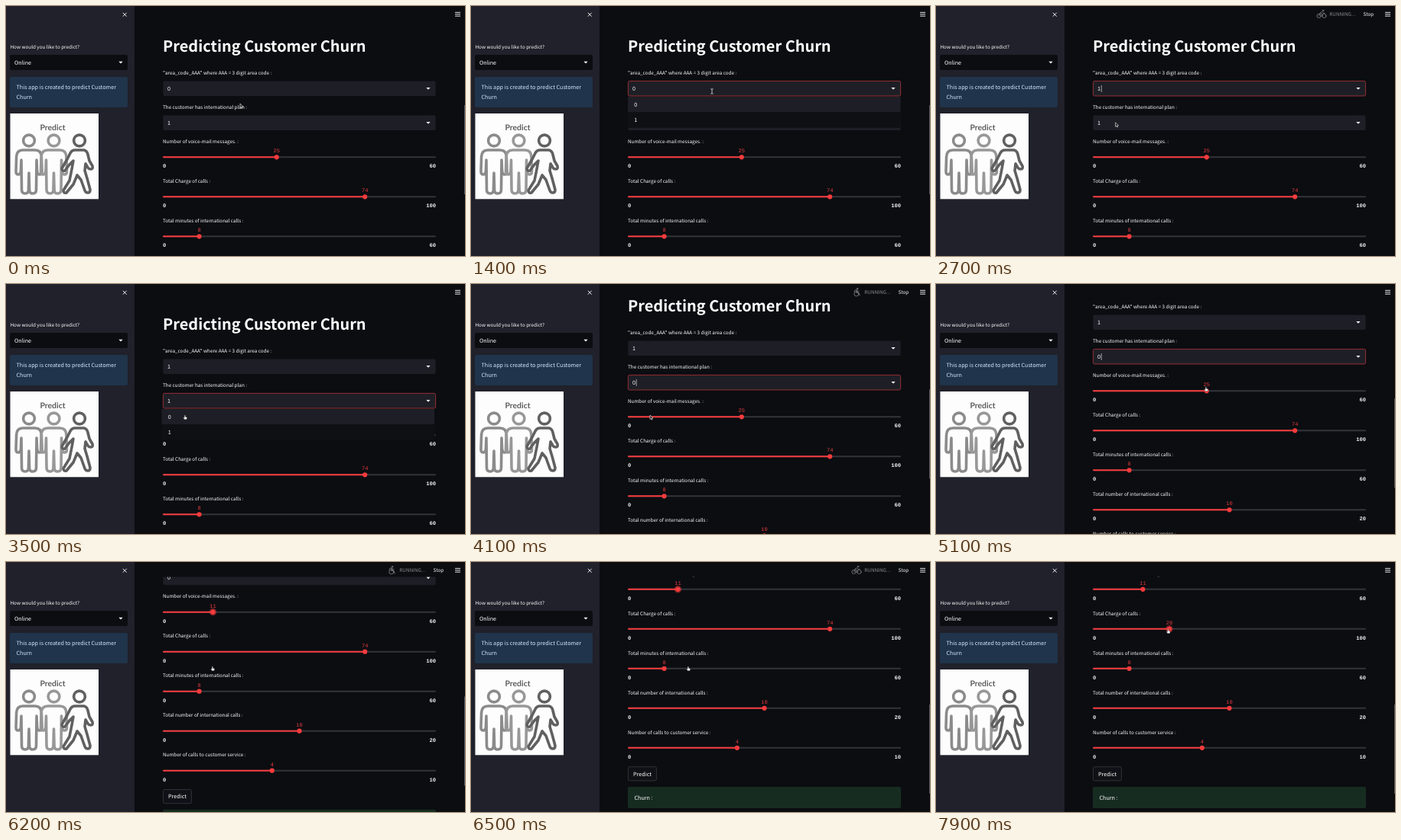
Recreate the animation shown at these times as an HTML page. Size 600x328 px, loop 8 s.

```html
<!DOCTYPE html>
<html lang="en">
<head>
<meta charset="utf-8">
<title>Predicting Customer Churn</title>
<style>
html, body { margin: 0; width: 100%; height: 100%; overflow: hidden; background: #0b0d11; }
svg { display: block; width: 600px; height: 328px; }
text {
  font: 500 6.35px "Noto Sans CJK JP", "Noto Sans CJK SC", "Noto Sans", sans-serif;
  fill: #fff; text-rendering: geometricPrecision; white-space: pre;
}
text.title { font-size: 19.95px; font-weight: 700; }
text.body { font-size: 7.2px; }
text.mono { font: 700 7.1px "Liberation Mono", monospace; fill: #f0f0f2; }
text.red { fill: #e63c3e; font-weight: 400; }
text.end { text-anchor: end; }
text.mid { text-anchor: middle; }
text.info { fill: #d3e9fc; }
text.dim { fill: #8d8e94; }
text.art { font: 700 10.4px Lato, sans-serif; fill: #5c5c5c; text-anchor: middle; }
.person { fill: none; stroke-width: 3.6; stroke-linejoin: round; stroke-linecap: round; }
.icon { fill: none; stroke: #85868c; stroke-width: .8; stroke-linecap: round; stroke-linejoin: round; }
</style>
</head>
<body>
<svg viewBox="0 0 600 328">
  <defs>
    <g id="standing">
      <circle cy="176.5" r="7.4"/>
      <path d="M-8 189H8Q16 189 16.4 198L17 217Q17 221 14 221T10.6 217L10 202 9.5 241Q9.5 246 5 246T.6 241L0 219-.6 241Q-.6 246-5 246T-9.5 241L-10 202-10.6 217Q-11 221-14 221T-17 217L-16.4 198Q-16 189-8 189Z"/>
    </g>
    <g id="walking">
      <circle cx="96" cy="176.5" r="7.4"/>
      <path d="M90 189H102Q106 190 107 195L109 203 113 210Q114 214 111 214T107 212L104 207 103 216 106 226 110 241Q110 245 107 245T103 242L98 228 93 222 88 234 79 245Q75 246 75 242L83 229 86 214 88 203 83 208 77 216Q73 217 73 213L80 201 84 193Q86 189 90 189Z"/>
    </g>
    <path id="arrow" d="M0 0V5.4L1.3 4.3 2.2 6.2 3 5.8 2.2 4H3.9Z" fill="#111" stroke="#fff" stroke-width=".6"/>
    <path id="hand" d="M-.8-2.6Q0-3.3.6-2.6V-.7L2.2-.3Q2.8 0 2.6.8L2.1 2.7H-.9L-2.2.6Q-2.2-.2-1.5 0L-.8.5Z" fill="#fff" stroke="#333" stroke-width=".5"/>
    <path id="beam" d="M-1.6-3.3Q0-3.3 0-2.4 0-3.3 1.6-3.3M0-2.4V2.4M-1.6 3.3Q0 3.3 0 2.4 0 3.3 1.6 3.3" fill="none" stroke="#e6e6e6" stroke-width=".8"/>
    <path id="chevron" d="M-2.6-1.2H2.6L0 1.5Z" fill="#fff"/>
    <g id="bike" class="icon">
      <circle cx="500.5" cy="13" r="2.6"/><circle cx="507.5" cy="13" r="2.6"/>
      <path d="M500.5 13 502 9.3 505 11 504.5 13.6M502 9.3 504.5 7.6 506 9.4H508"/>
      <circle cx="506" cy="6" r=".8"/>
    </g>
    <g id="chair" class="icon">
      <circle cx="503.8" cy="13" r="3"/><circle cx="505" cy="6.2" r=".8"/>
      <path d="M504.4 8 503.8 11.5H507L508.2 15M504.2 9.3H507M501 10.2 502 8 504.4 8"/>
    </g>
  </defs>

  <g id="page"></g>
  <rect x="168" width="432" height="19.5" fill="#0b0d11"/>
  <g id="head"></g>
  <path d="M587 8.4H594M587 10.8H594M587 13.2H594" stroke="#e4e4e6" stroke-width="1"/>
  <rect id="bar" x="599" width="1" height="117" fill="#5c5d62"/>

  <rect width="168" height="328" fill="#20212a"/>
  <path d="M152.8 8.8 157.7 13.7M157.7 8.8 152.8 13.7" stroke="#f0f0f2" stroke-width="1"/>
  <text x="5.5" y="56.3">How would you like to predict?</text>
  <rect x="5" y="64" width="154" height="20" rx="2" fill="#0b0d11"/>
  <text class="body" x="11" y="76.8">Online</text>
  <use href="#chevron" x="150" y="74"/>
  <rect x="5" y="93" width="154" height="40" rx="2" fill="#20344b"/>
  <text class="body info" x="13.5" y="109.3">This app is created to predict Customer</text>
  <text class="body info" x="13.5" y="121.8">Churn</text>
  <rect x="5.5" y="141" width="115.5" height="112.3" fill="#fdfdfd"/>
  <text class="art" x="61" y="163.3">Predict</text>
  <g class="person">
    <use href="#standing" x="30" stroke="#8b8b8b"/>
    <use href="#standing" x="62.5" stroke="#989898"/>
    <use href="#walking" stroke="#606060"/>
  </g>
  <use id="cursor"/>
</svg>
<script>
const LOOP = 8000, STEP = 100, LEFT = 205, WIDTH = 357;
const get = id => document.getElementById(id);

// [time, value...] rows, linear between them
const scrollKeys = [[3800, 0], [4100, 24], [4500, 58], [5700, 58], [6400, 162.5]];
const voiceKeys = [[5200, 25], [5600, 11]];
const chargeKeys = [[7600, 74], [7900, 28]];
const cursorKeys = [
  [300, 306, 128], [900, 315, 112], [1400, 315, 112], [1900, 236, 150], [2200, 236, 150],
  [2900, 234, 154], [3100, 234, 154], [3500, 234, 175], [3800, 234, 175], [4100, 234, 172],
  [4500, 234, 172], [5100, 353, 138], [5200, 353, 138], [5600, 270, 140], [6200, 270, 140],
  [6500, 284, 140], [7200, 469, 89], [7600, 469, 89], [7900, 303.5, 91]
];
// [start, shape]
const shapes = [[0, 'arrow'], [600, 'beam'], [1600, 'hand'], [2300, 'arrow'], [2800, 'beam'],
  [3200, 'hand'], [3800, 'arrow'], [4900, 'hand']];
const busy = [[2200, 3100], [3800, 4700], [5700, 6900]];

const within = (t, a, b) => t >= a && t < b;

function at(keys, t) {
  if (t <= keys[0][0]) return keys[0].slice(1);
  for (let i = 1; i < keys.length; i++) {
    const [a, ...from] = keys[i - 1], [b, ...to] = keys[i];
    if (t <= b) return from.map((v, j) => v + (to[j] - v) * (t - a) / (b - a));
  }
  return keys[keys.length - 1].slice(1);
}

const text = (x, y, s, cls = '') => `<text class="${cls}" x="${x}" y="${y}">${s}</text>`;
const rect = (x, y, w, h, fill, more = '') =>
  `<rect x="${x}" y="${y}" width="${w}" height="${h}" fill="${fill}" ${more}/>`;

function select(y, label, value, focus, caret) {
  const edge = focus ? 'stroke="#b5343a" stroke-width=".8"' : '';
  return text(LEFT, y - 7.7, label) +
    rect(LEFT + .4, y + .4, WIDTH - .8, 19.6, '#1e1f26', 'rx="2" ' + edge) +
    text(211, y + 13, value, 'body') +
    (caret ? rect(215.8, y + 6, .7, 9, '#d8d8dc') : '') +
    `<use href="#chevron" x="552" y="${y + 10.3}"/>`;
}

function menu(x, y, hover) {
  const row = i => rect(x, y + i * 20.4, WIDTH - .5, 20.4, i === hover ? '#1e1f26' : '#0f1014') +
    text(x + 8.3, y + i * 20.4 + 12.8, i, 'body');
  return row(0) + row(1);
}

function slider(y, label, value, max, active) {
  const x = LEFT + WIDTH * value / max, mid = y + .3;
  return text(LEFT, y - 18, label) +
    rect(LEFT, mid - 1, WIDTH, 2, '#33343a', 'rx="1"') +
    rect(LEFT, mid - 1, x - LEFT, 2, '#f63b3d', 'rx="1"') +
    (active ? `<circle cx="${x}" cy="${mid}" r="4.8" fill="#f63b3d" opacity=".45"/>` : '') +
    `<circle cx="${x}" cy="${mid}" r="3.1" fill="#f63b3d"/>` +
    text(x, y - 5.6, value, 'mono red mid') +
    text(LEFT, y + 14.2, 0, 'mono') + text(LEFT + WIDTH, y + 14.2, max, 'mono end');
}

function draw(t) {
  const [scroll] = at(scrollKeys, t), [x, y] = at(cursorKeys, t);
  const areaOpen = within(t, 1000, 2100), planOpen = within(t, 3200, 3700);
  const areaFocus = within(t, 900, 3100), planFocus = within(t, 3100, 5200);
  const parts = [
    text(LEFT, 60.4, 'Predicting Customer Churn', 'title'),
    select(98, '"area_code_AAA" where AAA = 3 digit area code :', t < 2100 ? 0 : 1,
      areaFocus, areaFocus && t >= 2100),
    select(143, 'The customer has international plan :', t < 3700 ? 1 : 0,
      planFocus, planFocus && t >= 3700),
    slider(198, 'Number of voice-mail messages. :', Math.round(at(voiceKeys, t)), 60, within(t, 5200, 7300)),
    slider(250, 'Total Charge of calls :', Math.round(at(chargeKeys, t)), 100, t >= 7300),
    slider(302, 'Total minutes of international calls :', 8, 60),
    slider(354, 'Total number of international calls :', 10, 20),
    slider(406, 'Number of calls to customer service :', 4, 10),
    rect(205.4, 431.2, 37, 18.2, '#0f1116', 'rx="2" stroke="#3a3b42" stroke-width=".8"'),
    text(212, 443, 'Predict', 'body'),
    rect(LEFT, 457.5, WIDTH, 28, '#172c21', 'rx="2"'),
    text(213.5, 474.3, 'Churn :', 'body'),
    areaOpen ? menu(205, 119, y > 139 ? 1 : 0) : '',
    planOpen ? menu(203.5, 164, 0) : ''
  ];
  const page = get('page');
  page.innerHTML = parts.join('');
  page.setAttribute('transform', `translate(0 ${-scroll})`);

  const icon = Math.floor(t / 500) % 2 ? 'bike' : 'chair';
  get('head').innerHTML = busy.some(([a, b]) => within(t, a, b))
    ? `<use href="#${icon}"/>` + text(514.3, 13.2, 'RUNNING...', 'dim') + text(558.6, 13.2, 'Stop')
    : '';

  const bar = get('bar');
  bar.setAttribute('y', 130 + scroll * .35);
  bar.setAttribute('opacity', within(t, 2000, 3800) || within(t, 5400, 5700) ? 0 : 1);

  const cursor = get('cursor');
  cursor.setAttribute('href', '#' + shapes.filter(s => s[0] <= t).pop()[1]);
  cursor.setAttribute('transform', `translate(${x} ${y})`);
}

let start, last;
function tick(now) {
  start ??= now;
  const t = Math.floor((now - start) % LOOP / STEP) * STEP;
  if (t !== last) draw(last = t);
  requestAnimationFrame(tick);
}
draw(0);
requestAnimationFrame(tick);
</script>
</body>
</html>
```
